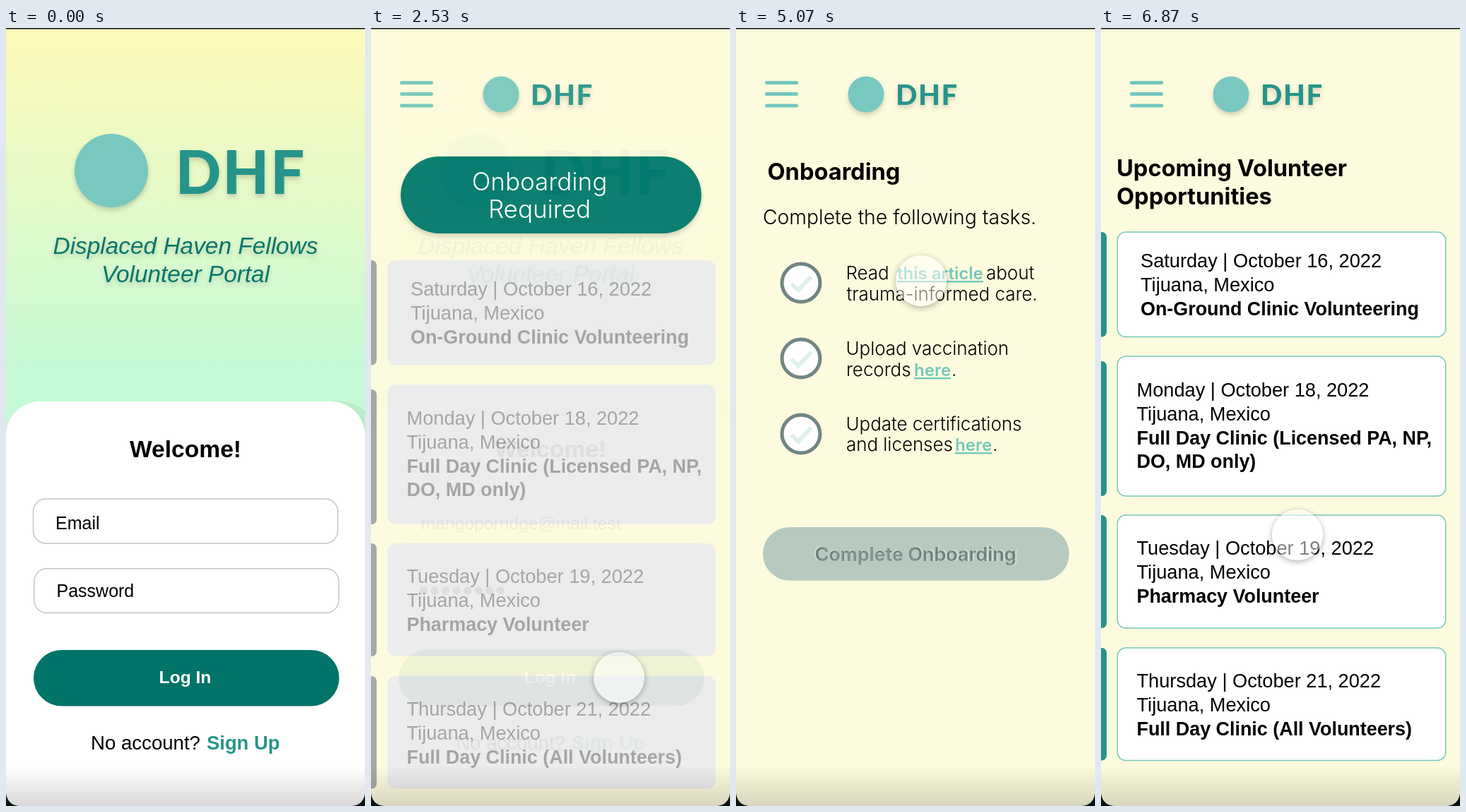
Write an HTML page that moves like this. It is 508 px wide and 1102 px high and loops after 6.94 s.

```html
<!DOCTYPE html>
<html lang="en">
<head>
<meta charset="utf-8">
<title>Volunteer Portal</title>
<style>
html, body { margin: 0; width: 100%; height: 100%; overflow: hidden; background: #0b1512; }
#stage { position: absolute; left: 0; top: 0; width: 508px; height: 1102px; overflow: hidden; }
svg { display: block; }
text { font-family: "Liberation Sans", Arial, sans-serif; white-space: pre; }
.mid { text-anchor: middle; }
.b { font-weight: 700; }
.geo { font-family: Inter, Lato, sans-serif; font-weight: 300; }
.head { font-family: Inter, Lato, sans-serif; font-weight: 700; font-size: 32.6px; }
.task text { font-size: 25.9px; }
.task .link { font-weight: 600; font-size: 24px; fill: #74c7be; text-decoration: underline; }
.brand { font-family: Lato, Inter, sans-serif; font-weight: 800; fill: #26948a; }
.soft { filter: drop-shadow(0 4px 3px rgba(0,0,0,.17)); }
#cursor {
  position: absolute; left: -36px; top: -36px; width: 72px; height: 72px; box-sizing: border-box;
  border-radius: 50%; border: 1.5px solid rgba(255,255,255,.3);
  background: rgba(255,255,255,.5);
  box-shadow: 0 2px 8px rgba(0,0,0,.32);
}
</style>
</head>
<body>
<div id="stage">
<svg width="508" height="1102" viewBox="0 0 508 1102">
  <defs>
    <linearGradient id="sky" gradientUnits="userSpaceOnUse" x1="0" y1="20" x2="0" y2="480">
      <stop offset="0" stop-color="#fdf9bb"/><stop offset="1" stop-color="#c7fad7"/>
    </linearGradient>
    <linearGradient id="shade" x1="0" y1="0" x2="0" y2="1">
      <stop offset="0" stop-opacity="0"/><stop offset="1" stop-opacity=".15"/>
    </linearGradient>
    <g id="list"></g>
    <path id="tick" d="M78.5 362L88 371.5L106.5 352" fill="none" stroke="#26948a" stroke-width="6"/>
  </defs>

  <g id="login">
    <rect width="508" height="1102" fill="url(#sky)"/>
    <g class="soft">
      <circle cx="149" cy="202" r="52" fill="#78c8c0"/>
      <text class="brand mid" x="332" y="235" font-size="85" letter-spacing="2">DHF</text>
    </g>
    <g class="soft mid" font-size="33.4" font-style="italic" fill="#04756a">
      <text x="254" y="320">Displaced Haven Fellows</text>
      <text x="254" y="360">Volunteer Portal</text>
    </g>
    <path d="M460 528Q490 527 508 542V580H480Z" fill="#bbecc8"/>
    <path d="M0 1102V577A48 48 0 0 1 48 529H460A48 48 0 0 1 508 577V1102Z" fill="#fff"/>
    <text class="mid b" x="254" y="608" font-size="33.6">Welcome!</text>
    <g fill="#fff" stroke="#c3c3c7" stroke-width="1.4">
      <rect x="38.5" y="667" width="431" height="63" rx="18"/>
      <rect x="39.8" y="765.8" width="431" height="62.7" rx="18"/>
    </g>
    <g id="empty" font-size="25">
      <text x="70" y="709.5">Email</text>
      <text x="71.5" y="806">Password</text>
    </g>
    <g id="filled">
      <text x="70.5" y="709.5" font-size="24.7">mangoporridge@mail.test</text>
      <path d="M74.5 797h110" stroke="#000" stroke-width="11.4" stroke-linecap="round" stroke-dasharray="0 15.55"/>
    </g>
    <rect x="39" y="881" width="432.5" height="79.5" rx="39.7" fill="#007468"/>
    <text class="mid b" x="253.5" y="928" font-size="24.6" fill="#fff">Log In</text>
    <text x="120" y="1022" font-size="27.6">No account?</text>
    <text class="b" x="284" y="1022" font-size="27.4" fill="#26948a">Sign Up</text>
  </g>

  <g id="app">
    <rect width="508" height="1102" fill="#fdfbdd"/>
    <rect class="soft" x="42" y="182" width="425.5" height="109" rx="54.5" fill="#00786b"/>
    <g class="mid" font-size="35" fill="#fff">
      <text class="geo" x="238.5" y="229.5">Onboarding</text>
      <text class="geo" x="238.5" y="269">Required</text>
    </g>
    <use href="#list" y="40" style="--card:#ebebeb;--line:none;--bar:#a3a3a3;--ink:#a0a0a0"/>

    <g id="tasks">
      <rect width="508" height="1102" fill="#fdfbdd"/>
      <text class="head" x="44.5" y="215">Onboarding</text>
      <text class="geo" x="38" y="278" font-size="28.3">Complete the following tasks.</text>
      <g class="task">
        <text class="geo" x="155.5" y="356">Read</text>
        <text class="geo link" x="228" y="356">this article</text>
        <text class="geo" x="354" y="356">about</text>
        <text class="geo" x="156.5" y="386">trauma-informed care.</text>
        <text class="geo" x="155.5" y="463">Upload vaccination</text>
        <text class="geo" x="156" y="493">records</text>
        <text class="geo link" x="252" y="493">here</text>
        <text class="geo" x="305" y="493">.</text>
        <text class="geo" x="155.5" y="569.5">Update certifications</text>
        <text class="geo" x="156" y="599">and licenses</text>
        <text class="geo link" x="310" y="599">here</text>
        <text class="geo" x="363" y="599">.</text>
      </g>
      <g fill="#fff" stroke="#808483" stroke-width="5">
        <circle cx="92" cy="361" r="27"/><circle cx="92" cy="468" r="27"/><circle cx="92" cy="575" r="27"/>
      </g>
      <rect x="38" y="707" width="433.5" height="75.5" rx="37.7" fill="#d5d9ce"/>
      <text class="geo mid" x="254" y="755" font-size="26.9" style="font-weight:600" fill="#7d8583">Complete Onboarding</text>
      <g id="done">
        <g fill="#fdfcee" stroke="#26948a" stroke-width="5">
          <circle cx="92" cy="361" r="26.5"/><circle cx="92" cy="468" r="26.5"/><circle cx="92" cy="575" r="26.5"/>
        </g>
        <use href="#tick"/><use href="#tick" y="107"/><use href="#tick" y="214"/>
        <rect x="38" y="707" width="433.5" height="76" rx="38" fill="#007468"/>
        <text class="geo mid" x="254.5" y="755" font-size="28.4" fill="#fff">Complete Onboarding</text>
      </g>
    </g>

    <g id="upcoming">
      <rect width="508" height="1102" fill="#fdfbdd"/>
      <text class="head" x="22" y="210">Upcoming Volunteer</text>
      <text class="head" x="22" y="250">Opportunities</text>
      <use href="#list" style="--card:#fff;--line:#74c7be;--bar:#26948a;--ink:#000"/>
    </g>

    <path d="M43.5 77.5H85.500M43.5 93.5H85.500M43.5 110H85.5" stroke="#72c7be" stroke-width="5" stroke-linecap="round"/>
    <g class="soft">
      <circle cx="184" cy="94" r="25.5" fill="#78c8c0"/>
      <text class="brand" x="226" y="109" font-size="40" letter-spacing="1.5">DHF</text>
    </g>
  </g>
</svg>
<div id="cursor"></div>
<svg width="508" height="1102" style="position:absolute;left:0;top:0">
  <rect y="1045" width="508" height="57" fill="url(#shade)"/>
  <path d="M0 0H508V1.6H0ZM0 1084Q2 1100 18 1102H0ZM508 1084Q506 1100 490 1102H508Z" fill="#06100d"/>
</svg>
</div>
<script>
const $ = id => document.getElementById(id);
const PERIOD = 6940, FADE = 350;

// Cards: top, height, bar top, text x, first baseline, date, bold lines
const cards = [
  [289, 148.5, 289, 56, 339, 'Saturday | October 16, 2022', 'On-Ground Clinic Volunteering'],
  [465, 198, 472, 50.5, 522, 'Monday | October 18, 2022', 'Full Day Clinic (Licensed PA, NP,', 'DO, MD only)'],
  [690, 160, 690, 50.5, 746, 'Tuesday | October 19, 2022', 'Pharmacy Volunteer'],
  [878, 159.5, 878, 50.5, 934, 'Thursday | October 21, 2022', 'Full Day Clinic (All Volunteers)']
];
$('list').innerHTML = cards.map(([y, h, barY, x, base, date, ...bold]) => {
  const lines = [date, 'Tijuana, Mexico', ...bold].map((s, i) =>
    `<text x="${x}" y="${base + i * 33.8}" font-size="${i < 2 ? 27.2 : 26.9}" ${i < 2 ? '' : 'class="b"'} style="fill:var(--ink)">${s}</text>`);
  return `<rect x="-20" y="${barY}" width="28" height="${y + h - barY}" rx="7" style="fill:var(--bar)"/>
    <rect x="23.2" y="${y}" width="464.5" height="${h}" rx="12" stroke-width="1.5" style="fill:var(--card);stroke:var(--line)"/>` + lines.join('');
}).join('');

// Cursor moves: start, duration, end point
const moves = [
  [100, 600, 190, 702],
  [1330, 600, 351, 920],
  [2750, 600, 343, 242],
  [4310, 600, 262, 358],
  [5350, 600, 278, 718]
];

const clamp = v => Math.min(1, Math.max(0, v));
const easeInOut = k => k < .5 ? 4 * k ** 3 : 1 - 4 * (1 - k) ** 3;
const fade = (t, start) => Math.sin(clamp((t - start) / FADE) * Math.PI / 2);
const show = (id, a) => $(id).setAttribute('opacity', a);

function draw() {
  const t = performance.now() % PERIOD;
  const typed = fade(t, 900);
  show('empty', 1 - typed);
  show('filled', typed);
  show('app', fade(t, 2255));
  show('tasks', fade(t, 3672));
  show('done', fade(t, 5038));
  show('upcoming', fade(t, 6460));

  let x = 560, y = 760;
  for (const [start, time, tx, ty] of moves) {
    const k = easeInOut(clamp((t - start) / time));
    x += (tx - x) * k;
    y += (ty - y) * k;
  }
  $('cursor').style.transform = `translate(${x}px, ${y}px)`;
  requestAnimationFrame(draw);
}
draw();
</script>
</body>
</html>
```
